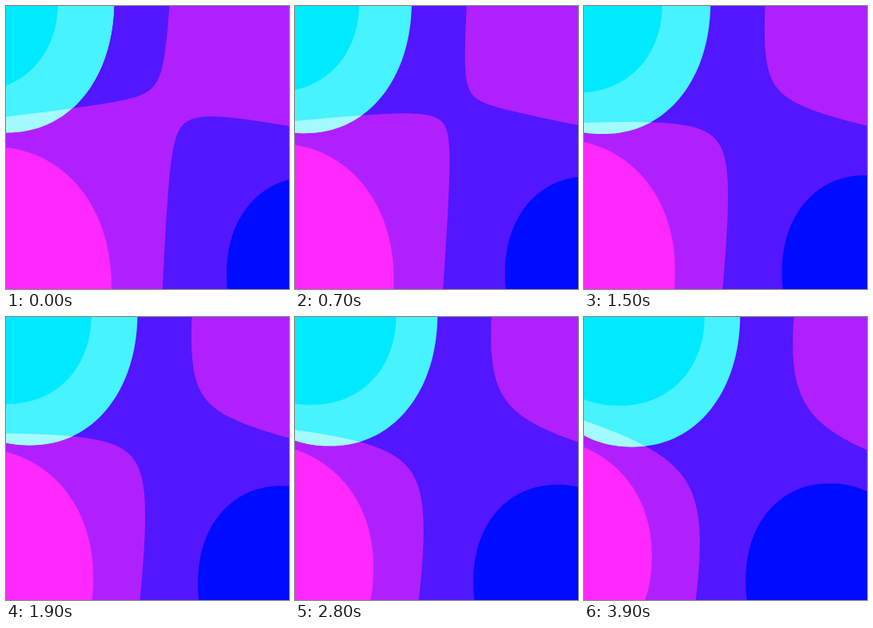
Recreate the animation shown at these times as an HTML page with a canvas. Size 354 by 354 pixels, loop 4000 ms.

```html
<!DOCTYPE html>
<html>
<head>
<meta charset="utf-8">
<style>
  html, body { margin: 0; width: 100%; height: 100%; overflow: hidden; background: #5216ff; }
  canvas { display: block; }
</style>
</head>
<body>
<canvas width="354" height="354"></canvas>
<script>
const SIZE = 354, LOOP = 4000, STEP = 100;
const SPLIT = 0.41;   // seconds until the two violet areas meet
const ROUNDNESS = 2.15;
const REACH = 400;    // how far curves run past the stage centre
const ctx = document.querySelector('canvas').getContext('2d');

function tracePath(count, pointAt) {
  const path = new Path2D();
  for (let i = 0; i <= count; i++) path.lineTo(...pointAt(i / count));
  return path;
}

// A slightly squared ellipse.
function blob(cx, cy, rx, ry) {
  const soften = v => Math.sign(v) * Math.abs(v) ** (2 / ROUNDNESS);
  return tracePath(180, f => {
    const angle = f * 2 * Math.PI;
    return [cx + rx * soften(Math.cos(angle)), cy + ry * soften(Math.sin(angle))];
  });
}

// Two opposite hyperbola branches in a skewed plane whose horizontal axis is bent.
function saddle(t) {
  const linear = t / 3.9, eased = linear ** 2;
  const cx = 203, cy = 124 + 17 * (linear + eased);
  const lean = -0.04 - 0.18 * linear;
  const slope = 0.04 + 0.2 * eased;
  const bend = 0.157 * (1 - eased);
  const gap = 1100 * (t - SPLIT);
  const joined = gap < 0;
  const radius = Math.sqrt(Math.abs(gap));
  const span = Math.log(REACH / radius);
  const toStage = (u, v) => [
    cx + u + lean * v,
    cy + v + slope * u + bend * (Math.hypot(u, 50) - 50)
  ];
  const parts = [-1, 1].map(side => {
    const vSide = joined ? side : -side;
    const path = tracePath(80, f => {
      const grow = Math.exp(span * (2 * f - 1));
      return toStage(side * radius * grow, vSide * radius / grow);
    });
    path.lineTo(...toStage(side * REACH, vSide * REACH));
    return path;
  });
  return { joined, parts };
}

function fill(path, color) {
  ctx.fillStyle = color;
  ctx.fill(path);
}

// While the purple is joined the violet areas lie on top, afterwards the reverse.
function paintField({ joined, parts }, violet, purple) {
  ctx.fillStyle = joined ? purple : violet;
  ctx.fillRect(0, 0, SIZE, SIZE);
  for (const part of parts) fill(part, joined ? violet : purple);
}

function draw(t) {
  const field = saddle(t);
  paintField(field, '#5216ff', '#b020ff');
  fill(blob(-20 - 12.1 * t, 354 - 14 * t, 152, 178 - 7.4 * t), '#ff28ff');
  fill(blob(381.5 - 18.9 * t, 336 - 1.5 * t, 105.5, 122), '#000cff');

  ctx.save();
  ctx.clip(blob(15.4 * t, t - 10, 135.3, 168.5));
  paintField(field, '#46f3ff', '#a4fbff');
  ctx.restore();
  fill(blob(22 * t - 42, t - 6, 107, 113), '#00eaff');
}

const start = performance.now();
function tick() {
  const elapsed = (performance.now() - start) % LOOP;
  draw(Math.floor(elapsed / STEP) * STEP / 1000);
  requestAnimationFrame(tick);
}
tick();
</script>
</body>
</html>
```
